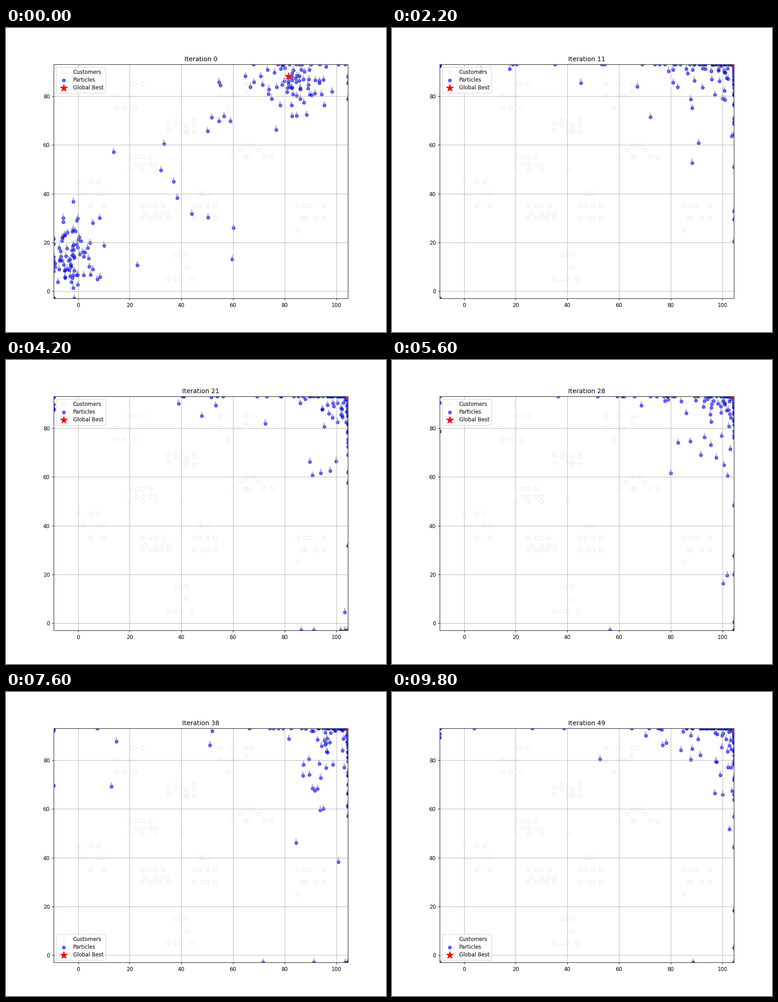
A matplotlib script for the animation above (10 s loop, 837 by 669 pixels).

```python
import numpy as np
import matplotlib.pyplot as plt
from matplotlib.animation import FuncAnimation
from matplotlib.collections import PolyCollection

FRAMES, STEP_MS = 50, 200
LOW, HIGH = np.array([-9.5, -3.0]), np.array([104.5, 93.0])
SPREAD = [8.0, 5.0]      # how far particles hop from the best corner
FIRST_BEST = (81.4, 88.2)
ARROW = np.array([(-0.5, 0.65), (0.5, 0.65), (0, 2.05)])

# customer x positions on each y row
ROWS = {
    85: [20, 22, 25, 55, 60, 65, 67], 82: [65], 80: [15, 20, 55, 60, 62],
    75: [15, 18, 22, 58], 70: [38, 45], 69: [35, 40], 68: [38, 42, 45],
    66: [35, 40, 42], 65: [42, 45], 60: [60, 65, 68], 58: [63, 70],
    55: [20, 23, 25, 28, 60, 65, 66, 72, 75], 52: [23, 25, 28, 30],
    50: [20, 25, 30, 40], 45: [0, 5, 8], 40: [0, 2, 8, 10, 47, 48, 50],
    35: [5, 10, 25, 28, 30, 33, 45, 47, 50, 53, 85, 88, 90, 95],
    32: [26, 30, 33, 35],
    30: [25, 28, 30, 32, 35, 45, 48, 50, 53, 87, 88, 92, 95],
    25: [85], 15: [38, 40, 42], 10: [42], 5: [35, 38, 40, 44],
}


def cluster(rng, center, spread, tail, count):
    return center + np.multiply(spread, rng.standard_t(tail, (count, 2)))


def initial_swarm():
    """Two dense groups at opposite corners and a few loners between."""
    rng = np.random.default_rng(4)
    loners = [(13.7, 57), (33.2, 60.5), (32.1, 49.6), (37, 45), (38.3, 38.3),
              (44, 31.8), (50.3, 30.2), (60.1, 25.9), (50.1, 65.6),
              (51.7, 71.2), (54.5, 69.7), (56.5, 71.8), (59, 69.7)]
    xy = np.vstack([loners,
                    cluster(rng, (-1.5, 13), (5, 6), 4, 88),
                    cluster(rng, (83, 87), (6.5, 5), 3, 80)])
    return np.clip(xy, LOW, HIGH)


START = initial_swarm()


def swarm(i):
    """Particles leave their start and hop around the best corner."""
    if i == 0:
        return START
    rng = np.random.default_rng(100 + i)
    hop = HIGH + SPREAD * rng.standard_cauchy(START.shape)
    lag = 0.5 ** i * rng.random((len(START), 1))
    return np.clip(hop + (START - hop) * lag, LOW, HIGH)


fig, ax = plt.subplots(figsize=(10, 7.993), dpi=83.7)
ax.set_xlim(LOW[0], HIGH[0])
ax.set_ylim(LOW[1], HIGH[1])
ax.grid(True)

customers = np.array([(x, y) for y, xs in ROWS.items() for x in xs])
ax.scatter(*customers.T, s=50, facecolors="none", edgecolors="#e0e0e0",
           linewidths=0.7, label="Customers")
dots = ax.scatter(*START.T, c="blue", alpha=0.6, label="Particles")
star = ax.scatter(*FIRST_BEST, c="red", marker="*", s=200, label="Global Best")
arrows = PolyCollection([], facecolors="gray", edgecolors="none", alpha=0.5)
ax.add_collection(arrows, autolim=False)
legend = ax.legend(loc="upper left", labelspacing=0.36)
title = ax.set_title("Iteration 0")


def update(i):
    xy = swarm(i)
    dots.set_offsets(xy)
    arrows.set_verts(xy[:, None] + ARROW)
    star.set_offsets([HIGH if i else FIRST_BEST])
    legend.set_loc("upper left" if i < 33 else "lower left")
    title.set_text(f"Iteration {i}")
    return dots, arrows, star, legend, title


anim = FuncAnimation(fig, update, frames=FRAMES, interval=STEP_MS, repeat=True)
plt.show()
```
